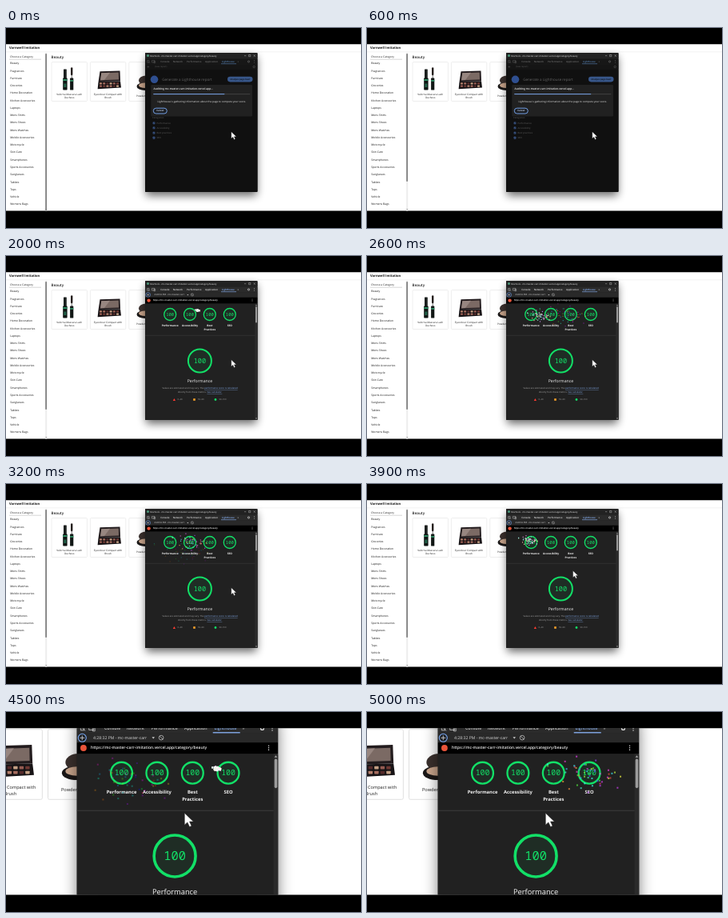
An HTML page for the animation above (5100 ms loop, 444 by 250 pixels).

```html
<!DOCTYPE html>
<html lang="en">
<head>
<meta charset="utf-8">
<title>Audit report</title>
<style>
html, body { margin: 0; width: 100%; height: 100%; overflow: hidden; background: #000; }
svg { display: block; width: 100%; height: 100%; }
text { font-family: "Open Sans", "Noto Sans", sans-serif; text-rendering: geometricPrecision; white-space: pre; }
.m { font-family: "Noto Sans Mono", "DejaVu Sans Mono", monospace; }
</style>
</head>
<body>
<svg id="stage" viewBox="0 0 444 250" xmlns="http://www.w3.org/2000/svg"></svg>
<script>
const LOOP = 5100, STEP = 100;
const GREEN = '#12e067', BLUE = '#7cacf8';
const host = 'mc-master-carr-imitation.vercel.app';

// y is the vertical middle of the capital letters
const text = (x, y, s, size, fill, more = '') =>
  `<text x="${x}" y="${(y + size * 0.34).toFixed(2)}" font-size="${size}" fill="${fill}" ${more}>${s}</text>`;
const mid = (x, y, s, size, fill, more = '') => text(x, y, s, size, fill, 'text-anchor="middle" ' + more);
const rect = (x, y, w, h, fill, more = '') =>
  `<rect x="${x}" y="${y}" width="${w}" height="${h}" fill="${fill}" ${more}/>`;
const circle = (x, y, r, fill, more = '') => `<circle cx="${x}" cy="${y}" r="${r}" fill="${fill}" ${more}/>`;
const oval = (x, y, rx, ry, fill) => `<ellipse cx="${x}" cy="${y}" rx="${rx}" ry="${ry}" fill="${fill}"/>`;
const path = (d, fill, more = '') => `<path d="${d}" fill="${fill}" ${more}/>`;
const line = (d, color, w = 0.5) => path(d, 'none', `stroke="${color}" stroke-width="${w}"`);
const dots = (x, y, color) => [-1.4, 0, 1.4].map(d => circle(x, y + d, 0.4, color)).join('');
const BOLD = 'font-weight="700"', SEMI = 'font-weight="600"', MEDIUM = 'font-weight="500"';

function sidebar() {
  const items = ['Beauty', 'Fragrances', 'Furniture', 'Groceries', 'Home Decoration',
    'Kitchen Accessories', 'Laptops', 'Mens Shirts', 'Mens Shoes', 'Mens Watches',
    'Mobile Accessories', 'Motorcycle', 'Skin Care', 'Smartphones', 'Sports Accessories',
    'Sunglasses', 'Tablets', 'Tops', 'Vehicle', 'Womens Bags'];
  return text(5, 36.3, 'Choose a Category', 3.3, '#222') +
    line('M4 39.2H44', '#999', 0.4) +
    items.map((s, i) => text(5.3, 44.2 + i * 9.26, s, 3.4, '#111', MEDIUM)).join('') +
    rect(49.2, 30.5, 2, 199, '#ededed') +
    `<rect id="thumb" x="49.3" y="32" width="1.6" fill="#747474" rx=".8"/>` +
    path('M49.3 226.2h1.8l-.9 1.4z', '#777');
}

function mascara() {
  return rect(72, 51.5, 3.8, 12, '#1b1f1e', 'rx=".5"') +
    rect(71.2, 62.5, 5.4, 15, '#0e1412', 'rx=".7"') +
    rect(71.2, 64, 5.4, 2, '#2d8a62') + rect(72.4, 69.5, 3, 4.5, '#1f5f47') +
    rect(81, 49.2, 2.4, 10, '#26201f', 'rx="1.2"') +
    rect(81.8, 59, 0.8, 4, '#555') +
    rect(80.1, 62.5, 4.2, 15, '#111715', 'rx=".6"') +
    rect(80.1, 65, 4.2, 1.8, '#2d8a62');
}

function palette() {
  const tones = ['#b5806c', '#6f3833', '#965c52', '#c4a084', '#552a2a', '#a56c5e'];
  let s = path('M117.5 54.2L142.5 53.4L143 66.5L115.6 67Z', '#231c1e') +
    path('M119.3 56.2L140.8 55.5L141 64.6L118.2 65.2Z', '#7b6a64') +
    path('M119.3 56.2L130 55.8L123 65.1L118.2 65.2Z', '#978680') +
    path('M115.6 67L143 66.5L144 74.5L114.6 76.2Z', '#181416');
  for (let i = 0; i < 12; i++)
    s += rect(117 + (i % 6) * 4.2, 68.3 + (i > 5 ? 3.3 : 0), 3, 2.1, tones[(i * 5 + (i > 5 ? 2 : 0)) % 6], 'rx=".4"');
  return s;
}

function page() {
  const cards = [57, 105.4, 153.8].map(x =>
    rect(x, 42.6, 44.4, 48.9, '#fff', 'rx="1" stroke="#ddd" stroke-width=".5"')).join('');
  return rect(0, 0, 444, 250, '#fff') +
    text(4, 24.6, 'Varnwell Imitation', 4.1, '#111', BOLD) +
    `<g id="login">${text(419.5, 21.4, 'Login | Signup', 3.3, '#888')}</g>` +
    line('M0 29.8H444', '#e8e8e8', 0.5) + sidebar() +
    text(56.6, 36.6, 'Beauty', 4.6, '#222', SEMI) + cards +
    mascara() + palette() +
    oval(174, 73, 10.5, 5, '#1a1717') + oval(175, 65.5, 9, 6, '#3a302d') + oval(174, 71.8, 8, 3.2, '#c9a58c') +
    mid(79.2, 83, 'Velorna Mascara Lash', 3.15, '#222') + mid(79.2, 87.4, 'Duchess', 3.15, '#222') +
    mid(127.5, 83, 'Eyecolour Compact with', 3.15, '#222') + mid(127.5, 87.4, 'Brush', 3.15, '#222') +
    text(163, 84.6, 'Powder Tin Case', 3.15, '#222');
}

function frame() {
  return rect(175, 36, 138.5, 173.5, '#000', 'rx="2" filter="url(#blur)" opacity=".6"') +
    rect(174, 31, 140.5, 174, '#1f1f1f', 'rx="1"') +
    rect(174, 31, 140.5, 7.6, '#222', 'rx="1"') +
    circle(177.5, 34.6, 1.5, '#4d9a7c') +
    text(180.3, 34.6, `DevTools - ${host}/category/beauty`, 2.8, '#eee') +
    line('M298 34.7h2.2M303.6 33.5h2.2v2.2h-2.2zM309.6 33.5l2.2 2.2m0-2.2l-2.2 2.2', '#ddd', 0.4);
}

function tabs(back, color, active) {
  const names = [[193.2, 'Console'], [208.7, 'Network'], [226, 'Performance'], [249, 'Application']];
  return rect(174, 38.6, 140.5, 6.8, back) +
    line('M176.6 40.4h2.4v2.8h-2.4zM177.8 41.6l2 2M182.4 40.4h3.4v2.6h-3.4zM185 41.4h1.6v2.4h-1.6z', color, 0.4) +
    names.map(([x, s]) => text(x, 41.9, s, 2.95, color, SEMI)).join('') +
    text(270, 41.9, 'Lighthouse', 2.95, active, SEMI) +
    rect(269, 44.5, 19, 0.8, active) +
    text(289.6, 41.8, '»', 3.4, color) +
    circle(303.5, 41.9, 1.1, 'none', `stroke="${color}" stroke-width=".7"`) +
    dots(310.5, 41.9, color);
}

function audit() {
  const checks = ['Performance', 'Accessibility', 'Best practices', 'SEO'];
  const dim = '#5c5c5c';
  return tabs('#171717', '#6c6c6c', '#557fb0') +
    rect(174, 45.4, 140.5, 6.4, '#151515') +
    line('M176.4 48.5h2.8M177.8 47.1v2.8', dim, 0.4) +
    text(186, 48.5, '(new report)', 2.7, dim) +
    circle(310.2, 48.5, 1.2, 'none', `stroke="${dim}" stroke-width=".6"`) +
    rect(174, 51.8, 140.5, 153.2, '#101010', 'rx="1"') +
    circle(185.5, 64.3, 4.8, '#2f4f90') +
    text(195.2, 64.2, 'Generate a Lighthouse report', 4.55, '#666') +
    rect(277, 60.8, 31.5, 6.6, '#38578a', 'rx="3.3"') +
    mid(292.7, 64, 'Analyze page load', 2.8, '#0b0f16', SEMI) +
    text(183, 112, 'Categories', 2.9, dim) +
    checks.map((s, i) => {
      const y = 118.8 + i * 6.15;
      return rect(183.6, y - 1.4, 2.8, 2.8, '#3a5688', 'rx=".4"') +
        line(`M184.2 ${y}l.6 .7l1.1-1.4`, '#101010', 0.4) + text(188.4, y, s, 2.9, dim);
    }).join('') +
    rect(181.3, 71, 126.7, 39.5, '#212121', 'rx="1.2"') +
    text(184.6, 76.3, `Auditing ${host}...`, 3.3, '#f4f4f4', SEMI) +
    rect(184.3, 82.2, 121, 0.9, '#444') +
    `<rect id="bar" x="184.3" y="82.2" height=".9" fill="${BLUE}"/>` +
    `<g id="wait">${mid(244.8, 91.6, 'Lighthouse is gathering information about the page to compute your score.', 3.17, '#e6e6e6')}</g>` +
    `<g id="done">${mid(244.8, 91.6, 'Almost there! Lighthouse is now generating your report.', 3.17, '#e6e6e6')}</g>` +
    rect(184.3, 100.2, 17, 6.8, '#1c1f24', `rx="3.4" stroke="${BLUE}" stroke-width=".9"`) +
    mid(192.8, 103.5, 'Cancel', 2.9, '#d2e2ff', SEMI);
}

function gauge(x, y, r, w, size) {
  return circle(x, y, r, '#1f2d25', `stroke="${GREEN}" stroke-width="${w}"`) +
    mid(x, y, '100', size, GREEN, 'class="m"');
}

function report() {
  const link = s => `<tspan fill="#8ab4f8" text-decoration="underline">${s}</tspan>`;
  const scores = [[205.2, 'Performance'], [230, 'Accessibility'], [254.8, 'Best', 'Practices'], [279.8, 'SEO']];
  return tabs('#2b2b2b', '#dcdcdc', '#8ab4f8') +
    rect(174, 45.4, 140.5, 6.4, '#292929') +
    circle(177.7, 48.5, 2.8, '#1f2329', `stroke="${BLUE}" stroke-width=".6"`) +
    line('M176.1 48.5h3.2M177.7 46.9v3.2', '#ddd', 0.45) +
    text(185.4, 48.4, '4:28:32 PM - mc-master-carr', 2.85, '#d6d6d6') +
    path('M226.4 47.9h2l-1 1.3z', '#ccc') +
    circle(232.9, 48.4, 1.6, 'none', 'stroke="#bbb" stroke-width=".45"') +
    line('M231.8 47.3l2.2 2.2', '#bbb', 0.45) +
    rect(174, 51.8, 140.5, 7.8, '#000') +
    circle(178.6, 55.6, 2.2, '#e8543a') +
    text(183.7, 55.4, `https://${host}/category/beauty`, 2.78, '#f2f2f2', SEMI) +
    dots(308, 55.4, '#eee') +
    rect(174, 59.6, 140.5, 145.4, '#212121', 'rx="1"') +
    rect(311.4, 59.6, 3.1, 145.4, '#2b2b2b') +
    path('M312 62.2h2l-1-1.5zM312 202.5h2l-1 1.5z', '#aaa') +
    rect(312, 63.2, 2, 20.4, '#9c9c9c', 'rx="1"') +
    scores.map(([x, a, b]) => gauge(x, 73, 7.5, 1.3, 5.5) + mid(x, 86.4, a, 3.25, '#f2f2f2', BOLD) +
      (b ? mid(x, 91.4, b, 3.25, '#f2f2f2', BOLD) : '')).join('') +
    line('M174 99.3H311.4', '#404040', 0.5) +
    gauge(242.4, 131, 14.5, 2, 8.6) +
    mid(242.4, 156.2, 'Performance', 5.2, '#f2f2f2') +
    mid(242.6, 165.3, `Values are estimated and may vary. The ${link('performance score is calculated')}`, 2.82, '#a8a8a8') +
    mid(242.6, 170.4, `directly from these metrics. ${link('See calculator.')}`, 2.82, '#a8a8a8') +
    path('M210.4 178l1.6 2.9h-3.2z', '#ff3b30') + text(214.5, 179.5, '0–49', 2.7, '#a0a0a0') +
    rect(234.2, 178.2, 2.6, 2.6, '#ffa42a') + text(240, 179.5, '50–89', 2.7, '#a0a0a0') +
    circle(262, 179.5, 1.4, GREEN) + text(266.4, 179.5, '90–100', 2.7, '#a0a0a0');
}

const arrow = path('M0 0V8.3L2 6.5L3.5 9.6L4.9 9L3.5 6H6.2Z', '#fff', 'stroke="#222" stroke-width=".3"');

// x, y, start time of each firework
const bursts = [[239, 68, 1950], [212, 74, 2330], [225, 70, 2770], [199, 70, 3680], [271, 70, 4450]];
const LIFE = 1000, COUNT = 52, DOT = 1.15;

let seed = 11;
const rnd = () => (seed = (seed * 16807) % 2147483647) / 2147483647;
const sparks = Array.from({ length: COUNT }, () => ({
  dx: (rnd() + rnd()) * 38 - 28,
  dy: (rnd() + rnd()) * 18 - 20,
  hue: Math.round(rnd() * 360)
}));

const stage = document.getElementById('stage');
stage.innerHTML = `<defs>
  <filter id="blur" x="-30%" y="-30%" width="160%" height="160%"><feGaussianBlur stdDeviation="5.5"/></filter>
  <clipPath id="view"><rect y="20.2" width="444" height="208.4"/></clipPath>
  <clipPath id="body"><rect x="174" y="59.6" width="137.4" height="145.4"/></clipPath></defs>
  <rect width="444" height="250"/>
  <g clip-path="url(#view)"><g id="camera">${page()}${frame()}
  <g id="audit">${audit()}</g><g id="report">${report()}</g>
  <g id="fire" clip-path="url(#body)"></g><g id="cursor">${arrow}</g></g></g>`;

const el = id => document.getElementById(id);
const show = (id, on) => el(id).setAttribute('display', on ? 'inline' : 'none');
const span = (t, a, b) => Math.min(1, Math.max(0, (t - a) / (b - a)));
const smooth = p => p * p * (3 - 2 * p);
const lerp = (a, b, p) => a + (b - a) * p;

// Sparks fly out and turn from white to their colour while they sink and fade
function fire(t) {
  return bursts.map(([x, y, start]) => {
    const p = (t - start) / LIFE;
    if (p < 0 || p >= 1) return '';
    const out = 1 - Math.pow(1 - p, 1.7), fall = Math.pow(p, 1.7);
    const light = lerp(100, 50, out).toFixed(1);
    return `<g opacity="${(1 - fall).toFixed(3)}">` + sparks.map(s =>
      rect((x + s.dx * out - DOT / 2).toFixed(2), (y + s.dy * out + 14 * fall - DOT / 2).toFixed(2),
        DOT, DOT, `hsl(${s.hue},100%,${light}%)`)).join('') + '</g>';
  }).join('');
}

function draw(t) {
  const ready = t >= 1700, late = t >= 700;
  show('audit', !ready);
  show('report', ready);
  show('wait', !late);
  show('done', late);
  show('login', t >= 900 && t < 1500);
  el('thumb').setAttribute('height', t < 300 ? 197 : 160);
  el('bar').setAttribute('width', late ? 119.8 : lerp(89, 97, span(t, 0, 700)));
  el('fire').innerHTML = fire(t);
  const move = smooth(span(t, 3600, 4050));
  el('cursor').setAttribute('transform', `translate(${lerp(281.8, 249.2, move)} ${lerp(129.8, 101, move)})`);
  const zoom = lerp(1, 1.79, smooth(span(t, 4080, 4500)));
  el('camera').setAttribute('transform', `translate(282 69) scale(${zoom}) translate(-282 -69)`);
}

let begin = null, last = -1;
function tick(now) {
  if (begin === null) begin = now;
  const t = Math.floor(((now - begin) % LOOP) / STEP) * STEP;
  if (t !== last) draw(last = t);
  requestAnimationFrame(tick);
}
draw(0);
requestAnimationFrame(tick);
</script>
</body>
</html>
```
